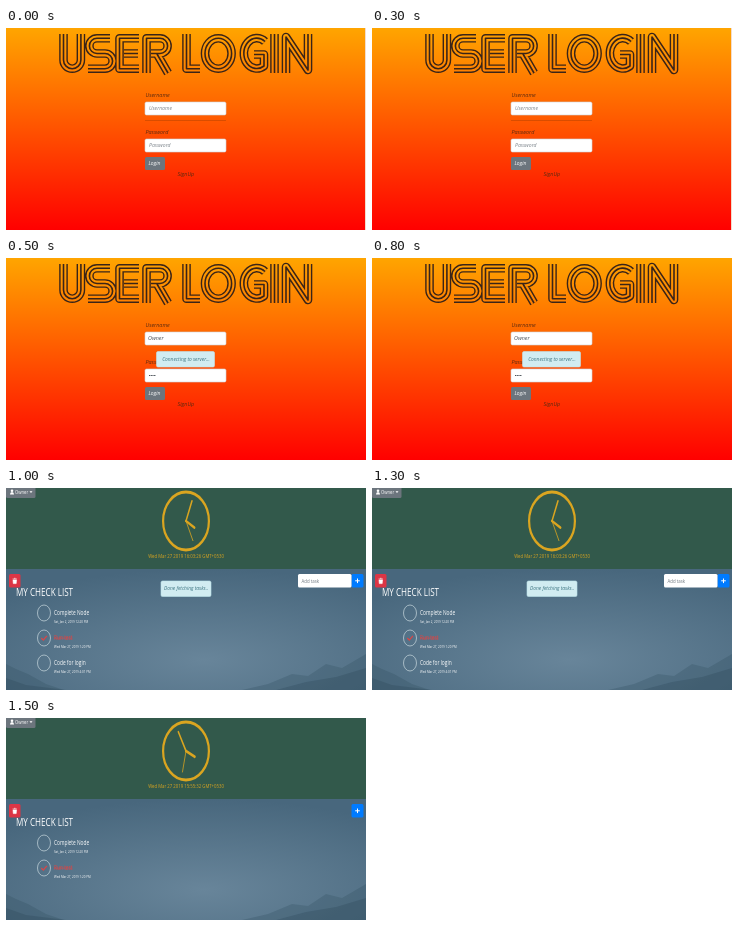
An HTML page that plays this animation: 360x202 px, repeating every 2 s.

```html
<!DOCTYPE html>
<html lang="en">
<head>
<meta charset="utf-8">
<title>Login and check list</title>
<style>
  html, body { margin: 0; width: 100%; height: 100%; overflow: hidden; }
  svg { display: block; width: 100%; height: 100%; }
  text { font-family: "Open Sans", sans-serif; }
  #login text { font-style: italic; font-size: 5.4px; fill: #5a2a10; }
  #login .hint { fill: #7c848b; font-size: 5.1px; }
  #login .value { fill: #495057; }
  #login .button { fill: #fff; font-size: 5px; }
  .field { fill: #fff; stroke: #ced4da; stroke-width: .6; }
  .toast rect { fill: #d1ecf1; stroke: #bee5eb; stroke-width: .6; }
  #login .toast text, #board .toast text { fill: #3c7480; font-size: 4.9px; font-style: italic; text-anchor: middle; }
  .title { fill: none; stroke-linejoin: round; }
  #board text { fill: #fff; }
  /* The whole page is shown narrower than it was laid out. */
  #board .narrow { transform: scaleX(.78); transform-box: fill-box; transform-origin: left; }
  #board .date { font-size: 3.800px; }
  #board .task { font-size: 6.200px; }
  #board .done { fill: #dc4545; text-decoration: line-through; }
  #board .stamp { fill: #daa520; font-size: 5.500px; text-anchor: middle; transform-origin: center; }
  #board .hint { fill: #6c757d; font-size: 5.600px; }
  .clock { fill: none; stroke: #daa520; stroke-linecap: round; }
  .ring { fill: none; stroke: #c9d8df; stroke-width: .7; }
</style>
</head>
<body>
<svg viewBox="0 0 360 202" preserveAspectRatio="none">
  <defs>
    <linearGradient id="fire" gradientUnits="userSpaceOnUse" x1="0" y1="0" x2="0" y2="202">
      <stop stop-color="#ffa500"/><stop offset="1" stop-color="#f00"/>
    </linearGradient>
    <radialGradient id="sky" cx=".55" cy=".75" r=".75">
      <stop stop-color="#68859a"/><stop offset="1" stop-color="#48677d"/>
    </radialGradient>
    <path id="letters" d="M57.500 6V32a8.700 8.700 0 0 0 17.400 0V6
      M104 10.300H91a7.600 7.600 0 0 0 0 15.200h8a7.600 7.600 0 0 1 0 15.200H82
      M133 10.300H113.500V40.700H133M118 25.500H132
      M140.500 45V10.300H154a7.600 7.600 0 0 1 0 15.200H145M151 26L162 45
      M180.500 6V40.700H194
      M199 25.500a13.300 15.200 0 0 1 26.600 0a13.300 15.200 0 0 1 -26.600 0z
      M259 13.500A13 15.200 0 1 0 258 38V26.500H248
      M268.500 6V45
      M280 45V9L302 42V6"/>
  </defs>

  <g id="login">
    <rect width="360" height="202" fill="url(#fire)"/>
    <g class="title">
      <use href="#letters" stroke="#3a2418" stroke-width="8.600"/>
      <use href="#letters" stroke="url(#fire)" stroke-width="5.800"/>
      <use href="#letters" stroke="#3a2418" stroke-width="1.600"/>
    </g>
    <text x="139.500" y="69">Username</text>
    <rect class="field" x="139" y="74" width="81" height="13" rx="1.500"/>
    <text x="139.500" y="106">Password</text>
    <rect class="field" x="139" y="111" width="81" height="13" rx="1.500"/>
    <g id="empty">
      <path d="M139 92.500H220" stroke="#a33a00" opacity=".4"/>
      <path d="M359.500 0V202" stroke="#f3dccb"/>
      <text class="hint" x="143" y="82.300">Username</text>
      <text class="hint" x="143" y="119.300">Password</text>
    </g>
    <g id="filled">
      <text class="value" x="142" y="82.300">Owner</text>
      <path d="M143 117.500h7" stroke="#495057" stroke-dasharray="1.200 .5"/>
      <g class="toast">
        <rect x="150.500" y="93.500" width="58" height="15.500" rx="1.500"/>
        <text x="180" y="102.600">Connecting to server...</text>
      </g>
    </g>
    <rect x="139" y="129" width="20" height="13" rx="1.500" fill="#6c757d"/>
    <text class="button" x="142.500" y="137.300">Login</text>
    <text x="171.500" y="147.800">SignUp</text>
  </g>

  <g id="board">
    <rect width="360" height="81" fill="#32594b"/>
    <rect y="81" width="360" height="121" fill="url(#sky)"/>
    <path d="M0 176L10 181 22 186 40 196 58 202H0zM236 202L262 196 286 186 302 188 320 176 336 180 360 166V202z" fill="#344f62" opacity=".3"/>
    <path d="M0 190L20 197 60 202H0zM270 202L300 194 330 189 360 180V202z" fill="#2b4557" opacity=".3"/>

    <rect x="0" y="-2" width="29.500" height="12" rx="1.500" fill="#6c757d"/>
    <path d="M4 6.500q0-2.500 2-2.500t2 2.500z" fill="#fff"/>
    <circle cx="6" cy="2.700" r="1.300" fill="#fff"/>
    <text class="narrow" x="9" y="6" font-size="5.400">Owner</text>
    <path d="M23.500 3.300h3l-1.500 1.700z" fill="#fff"/>

    <g class="clock" transform="translate(180 33) scale(.79 1)">
      <circle r="29" stroke-width="2.800"/>
      <path id="hour" d="M0 0V-12.500" stroke-width="2.600"/>
      <path id="minute" d="M0 0V-21.500" stroke-width="1.900"/>
      <path id="second" d="M0 0V-21.500" stroke-width=".8"/>
    </g>
    <text id="stamp" class="narrow stamp" x="180" y="70"></text>

    <rect x="3" y="86" width="11.500" height="13.500" rx="1.500" fill="#dc3545"/>
    <path d="M6.500 91h4.500M8 90.300h1.500M7 92h3.500l-.3 3.600h-2.900z" fill="#fff" stroke="#fff" stroke-width=".6"/>
    <text class="narrow" x="10" y="108" font-size="10.400" font-weight="500">MY CHECK LIST</text>
    <rect x="345.500" y="86" width="12" height="13.500" rx="1.500" fill="#007bff"/>
    <path d="M349.200 92.800h4.600M351.500 90.500v4.600" stroke="#fff"/>

    <ellipse class="ring" cx="38" cy="125" rx="6.500" ry="8"/>
    <text class="narrow task" x="48" y="127.300">Complete Node</text>
    <text class="narrow date" x="48" y="135">Sat, Jan 2, 2019 12:20 PM</text>
    <ellipse class="ring" cx="38" cy="150" rx="6.500" ry="8"/>
    <path d="M35.300 150l2 2.200 3.600-4.400" fill="none" stroke="#dc4545" stroke-width="1.200"/>
    <text class="narrow task done" x="48" y="152.300">Run test</text>
    <text class="narrow date" x="48" y="160">Wed Mar 27, 2019 1:20 PM</text>

    <g id="loaded">
      <rect x="292" y="86" width="53.500" height="13.500" rx="1.500" fill="#fff"/>
      <text class="narrow hint" x="295.500" y="94.700">Add task</text>
      <ellipse class="ring" cx="38" cy="175" rx="6.500" ry="8"/>
      <text class="narrow task" x="48" y="177.300">Code for login</text>
      <text class="narrow date" x="48" y="185">Wed Mar 27, 2019 4:01 PM</text>
      <g class="toast">
        <rect x="155" y="93" width="50" height="15.500" rx="1.500"/>
        <text x="180" y="102.300">Done fetching tasks..</text>
      </g>
    </g>
  </g>
</svg>
<script>
  const $ = id => document.getElementById(id);
  const show = (id, on) => { $(id).style.display = on ? "" : "none"; };
  const turn = (id, degrees) => $(id).setAttribute("transform", `rotate(${degrees})`);

  function setClock(h, m, s) {
    turn("hour", (h % 12 + m / 60) * 30);
    turn("minute", (m + s / 60) * 6);
    turn("second", s * 6);
    const time = [h, m, s].map(n => String(n).padStart(2, "0")).join(":");
    $("stamp").textContent = `Wed Mar 27 2019 ${time} GMT+0530`;
  }

  function draw(ms) {
    const scene = Math.floor(ms % 2000 / 500);
    show("login", scene < 2);
    show("empty", scene === 0);
    show("filled", scene === 1);
    show("board", scene > 1);
    show("loaded", scene === 2);
    if (scene === 2) setClock(16, 3, 26);
    else setClock(15, 55, 32);
  }

  const start = performance.now();
  function tick() {
    draw(performance.now() - start);
    requestAnimationFrame(tick);
  }
  tick();
</script>
</body>
</html>
```
